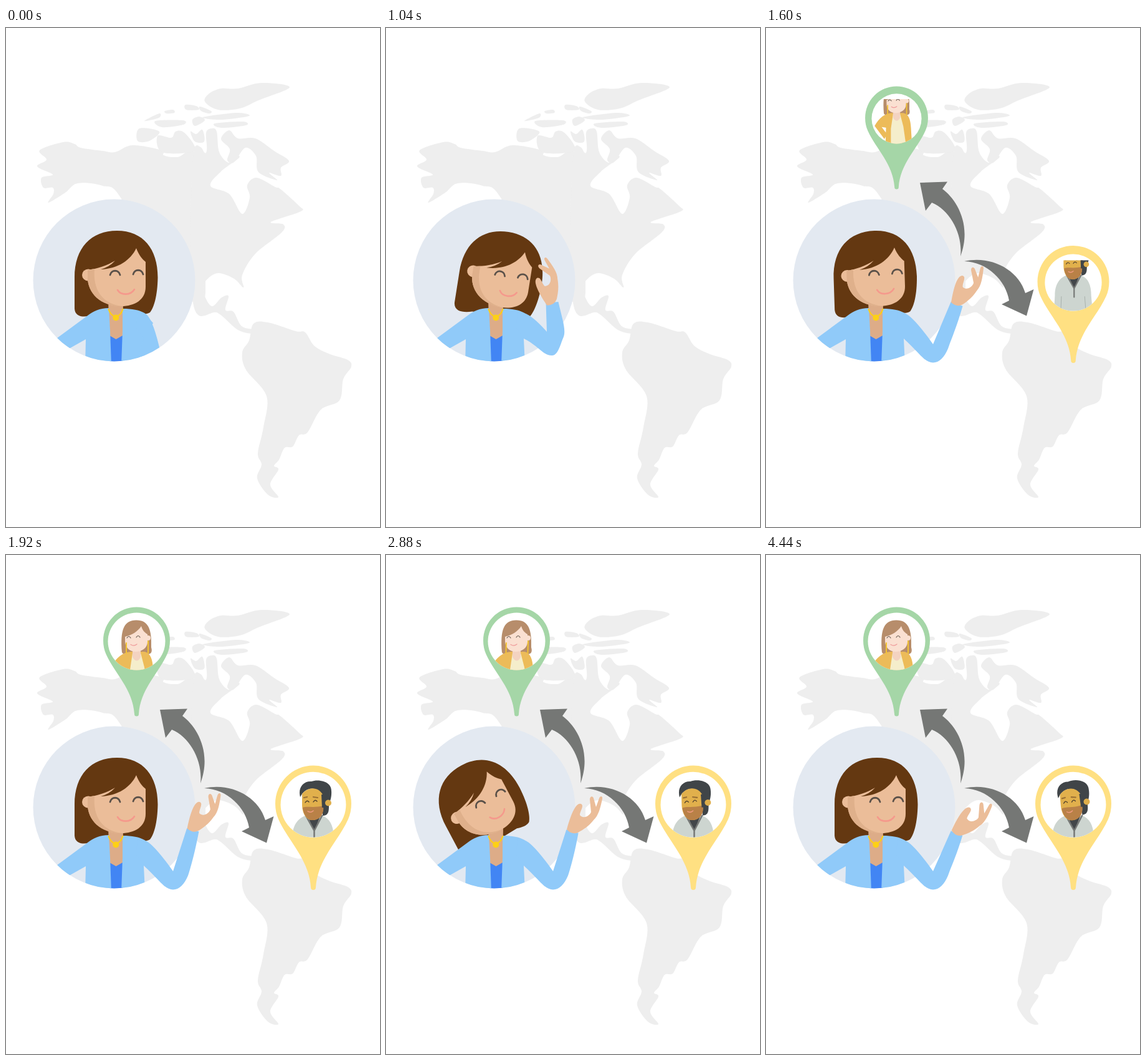
Recreate the animation shown at these times as an HTML page. Size 600 by 800 pixels, loop 8000 ms.

```html
<!DOCTYPE html>
<html lang="en">
<head>
<meta charset="utf-8">
<title>Connections across the map</title>
<style>
html, body { margin: 0; width: 100%; height: 100%; overflow: hidden; background: #fff; }
svg { display: block; width: 600px; height: 800px; }
.line { fill: none; stroke-linecap: round; }
</style>
</head>
<body>
<svg viewBox="0 0 600 800">
  <defs>
    <clipPath id="disc"><circle cx="173.5" cy="404.5" r="130"/></clipPath>
    <clipPath id="window"><path d="M-46-36V0A46 46 0 0 0 46 0V-36Z"/></clipPath>
    <path id="pinShape" d="M-53.5-121A53.5 53.5 0 0 1 53.5-121Q53.5-109 49-99C35-68 6-43 3.5-3A3.5 3.5 0 0 1-3.5-3C-6-43-35-68-49-99Q-53.5-109-53.5-121Z"/>
  </defs>

  <g id="map" fill="#eee">
    <!-- west and north coast -->
    <polygon points="50,222 65,211 54,196 92,183 110,186 120,192 155,197 175,199 203,188 250,196 253,204 275,207 318,201 320,380 312,440 250,400 184,272 155,253 115,249 95,264 68,280 76,266 75,256 60,256 57,240 75,235"/>
    <!-- east coast, bay and isthmus -->
    <polygon points="300,206 321,200 321,168 330,161 338,166 342,199 357,216 366,205 374,208 345,230 328,253 358,266 379,298 391,272 387,252 402,240 432,255 440,258 470,285 473,294 425,311 445,315 442,328 400,362 379,396 381,416 366,402 340,393 320,406 317,424 330,446 346,432 357,430 352,452 365,455 378,478 399,484 397,490 372,484 340,457 300,440"/>
    <polygon points="345,178 358,164 372,177 400,177 430,197 454,213 441,224 441,237 422,232 435,244 405,231 401,205 384,192 366,215 355,212 359,194"/>
    <!-- south -->
    <polygon points="397,474 420,472 465,486 480,488 495,510 520,523 548,532 554,543 541,563 535,597 505,612 484,648 470,653 460,671 447,673 438,692 430,702 437,708 424,732 437,752 420,748 403,722 410,700 404,682 413,640 418,590 385,548 379,520 390,501"/>
    <!-- arctic islands -->
    <polygon points="345,97 372,97 410,88 455,95 405,116 375,129 340,131 319,118 326,105"/>
    <polygon points="316,143 370,136 390,141 345,147"/>
    <polygon points="335,153 380,150 385,156 345,160"/>
    <polygon points="288,123 305,125 309,131 289,131"/>
    <polygon points="311,126 329,133 326,137 313,133"/>
    <polygon points="255,133 268,131 270,136 257,137"/>
    <polygon points="222,149 246,137 245,144"/>
    <polygon points="240,149 284,148 284,155 250,159"/>
    <polygon points="299,147 310,142 319,148 303,157"/>
    <polygon points="214,161 246,166 230,181 211,181"/>
    <polygon points="243,173 265,176 272,166 285,167 302,188 298,199 250,199"/>
    <polygon points="296,166 305,170 315,163 318,182 303,182"/>
  </g>
  <circle cx="173.5" cy="404.5" r="130" fill="#e3e9f1"/>

  <g fill="#757775">
    <path id="arrowUp" d="M247 248L291 246.500L283 258C305 274 331 315 312 366C316 330 295 292 266 280L256 293Z"/>
    <path id="arrowDown" d="M318 374C360 364 405 387 416 425L429.500 419L418 461.500L378 443L390 437C385 405 355 375 318 374Z"/>
  </g>

  <g id="greenPin">
    <use href="#pinShape" fill="#a5d6a7"/>
    <g class="porthole">
      <circle r="46" fill="#fff"/>
      <g clip-path="url(#window)"><g class="person"><g transform="translate(-209.500 -138.500)">
        <path fill="#b78d6b" d="M186 156C183 120 189 104.500 209 104.500C229 104.500 234 120 233 148Q236 159 227 159H194Q188 160 186 156Z"/>
        <path fill="#ecbb59" d="M200 155H222C232 157 235 167 236 182L238 215H189L190 182L182 181L192 194L187 203L169 179C177 164 188 156 200 155Z"/>
        <path fill="#f5eecb" d="M203 157L199 184V215H227L222 180L216 157Z"/>
        <path fill="#f3d3c1" d="M203 150H216V164Q210 175 203 164Z"/>
        <circle cx="228" cy="133" r="4" fill="#fae0d1"/>
        <path fill="#fae0d1" d="M191 131C203 128 212 122 217 114C219 121 223 125 227 127V139C227 149 218 155 208 155C198 155 191 148 191 138Z"/>
        <path class="line" stroke="#685a52" stroke-width="1.2" d="M194 133Q197 128 200 133M209 132Q212 127 215 132"/>
        <path class="line" stroke="#ef9a9a" stroke-width="1.3" d="M200 143.500Q205 147 210 143"/>
        <g class="line" stroke="#f4c430" stroke-width="2">
          <path class="earring" d="M193 141V157"/><path class="earring" d="M228 138V157"/>
        </g>
      </g></g></g>
    </g>
  </g>

  <g id="yellowPin">
    <use href="#pinShape" fill="#ffe082"/>
    <g class="porthole">
      <circle r="46" fill="#fff"/>
      <g clip-path="url(#window)"><g class="person"><g transform="scale(.877) translate(-493 -400.300)">
        <path fill="#cdd5d0" d="M459 455C459 432 470 420 484 417H504C518 420 526 432 526 455L529 490H457Z"/>
        <path class="line" stroke="#a9b2ad" stroke-width="1.2" d="M471 457L470 482M514 457L516 482"/>
        <path fill="#424649" d="M484 419H504L494.500 443Z"/>
        <path class="line" stroke="#757775" stroke-width="2.5" d="M481 418L494.500 442L507 418M494.500 441V458"/>
        <g id="manHead">
          <path fill="#404548" d="M472 388C468 373 477 362 490 363C500 359 522 362 522 378C523 391 518 397 518 404C518 413 516 418 508 418V385C499 372 485 371 475 383Z"/>
          <circle cx="517" cy="397.5" r="5" fill="#deae4b"/>
          <path fill="#e1b04c" d="M475 383C485 371 502 371 509 386V405C509 419 500 426 490 425C480 424 475 412 475 400Z"/>
          <path fill="#b98147" d="M476 405C483 402 493 406 509 402C511 418 501 426 490 425C482 424 477 415 476 405Z"/>
          <path fill="#404548" d="M506 384H510V405H507Z"/>
          <path class="line" stroke="#9a7034" stroke-width="2.2" d="M478 389L483 388M493 388L500 389"/>
          <path class="line" stroke="#56452d" stroke-width="1.4" d="M480 397Q483 392 486 396M493 396Q496 391 499 395"/>
          <path class="line" stroke="#ef9a7f" stroke-width="1.5" d="M484 411Q489 414 493 410"/>
        </g>
      </g></g></g>
    </g>
  </g>

  <g clip-path="url(#disc)">
    <path class="head" fill="#643811" d="M110 450V400C110 352 137 325 178 325C220 325 243.500 354 243.500 400C243 430 237 449 231 456C225 460 216 458 209 456L140 460C127 464 111 465 110 450Z"/>
    <path fill="#ddac88" d="M164 436H188L187 500H166Z"/>
    <path fill="#4285f4" d="M166 493L176.500 499L187 493V540H166Z"/>
    <path fill="#90caf9" d="M165 449C150 449 140 454 131 461L78 500L96 517L128 499L127 540H169L167 485ZM187 450C203 450 213 452 222 457L236 473L221 498L223 540H185L187 485Z"/>
    <path class="line" stroke="#fdd015" stroke-width="2.2" d="M164.500 451Q168 461 176 463Q184 461 187.500 451"/>
    <circle cx="176.3" cy="464.5" r="5" fill="#fdd015"/>
    <g class="head">
      <ellipse cx="132" cy="396" rx="10" ry="9.5" fill="#ebbd99"/>
      <path fill="#ebbd99" d="M131 388C146 386 162 381 175 373Q166 383 152 387C180 386 200 372 209 353C213 364 219 371 224 375V415C224 436 206 446 185 446C152 446 131 425 131 400Z"/>
      <path fill="#dfb08b" d="M131 388L142 386C139 420 155 443 187 446C152 447 131 425 131 400Z"/>
      <path class="line" stroke="#5b5149" stroke-width="2.8" d="M167 396C169 387 181 387 183 396M204 395C206 386 218 386 220 395"/>
      <path class="line" stroke="#f5998c" stroke-width="2.6" d="M179 420C184 429 200 429 206 419"/>
    </g>
  </g>

  <g id="arm">
    <path id="sleeve" fill="#90caf9"/>
    <path id="hand" fill="#ebbd99" d="M290 440C293 429 298 412 304 404C308 398 314 397 315 402C315 407 311 412 311 417C317 424 327 418 329 412L327 392C327 386 332 386 333 390L337 404L342 390C344 385 348 387 347 391C344 405 341 418 333 425C325 435 317 440 308 445Q298 449 290 440Z"/>
  </g>
</svg>

<script>
const $ = s => document.querySelector(s), all = s => document.querySelectorAll(s);
const set = (el, transform) => el.setAttribute('transform', transform);

// closed Catmull-Rom curve through a polygon's corners
function coast(polygon) {
  const pts = [...polygon.points].map(p => [p.x, p.y]);
  const at = i => pts[(i + pts.length) % pts.length];
  return 'M' + pts[0] + pts.map((p, i) => {
    const next = at(i + 1), before = at(i - 1), after = at(i + 2);
    const c1 = p.map((v, k) => v + (next[k] - before[k]) / 6);
    const c2 = next.map((v, k) => v - (after[k] - p[k]) / 6);
    return `C${c1} ${c2} ${next}`;
  }).join('') + 'Z';
}
$('#map').innerHTML = [...all('#map polygon')].map(p => `<path d="${coast(p)}"/>`).join('');

// keys: [time, ...values], eased between neighbours
function track(keys, t) {
  const i = keys.findIndex(k => k[0] > t);
  if (i === 0) return keys[0].slice(1);
  if (i < 0) return keys[keys.length - 1].slice(1);
  const a = keys[i - 1], b = keys[i], p = (t - a[0]) / (b[0] - a[0]), e = p * p * (3 - 2 * p);
  return a.slice(1).map((v, k) => v + (b[k + 1] - v) * e);
}

const headTurn = [[40, 0], [900, 9], [1080, 9], [1420, -3.5], [1800, 0], [2500, 0], [2900, -28.2], [3060, -29], [3480, -27], [4280, 0]];
const manTurn = [[2440, 0], [3700, -5]];
const pinScale = [[1240, 0], [1700, 1.07], [1920, 1]];
const portholeScale = [[1240, .5], [1720, 1]];
const personRise = [[1300, 90], [1560, -27], [1640, -27], [1900, 0]];
const arrowScale = [[1220, 0], [1520, 1]];
// inner bend, outer bend, lowest point
const elbow = [
  [420, 250, 530, 262, 600, 222, 570],
  [600, 254, 512, 290, 545, 258, 550],
  [760, 252, 492, 277, 500, 256, 529],
  [1040, 258, 487, 285, 495, 266, 525],
  [1140, 258, 488, 285, 496, 266, 526],
  [1460, 268, 507, 292, 514, 268, 536.5],
];
// wrist position and hand angle
const wrist = [
  [420, 262, 640, 90], [600, 310, 520, 40], [760, 258, 446, -55],
  [1040, 266.5, 440, -49], [1140, 266, 441, -50], [1460, 312, 447, 4],
  [1620, 306, 442, -6], [2100, 297, 440, -2.5], [2480, 297, 440, -2.5],
  [2880, 299, 443, 0], [3720, 300, 443, .5], [4400, 306, 446, 10],
];

function drawArm(t) {
  const [ix, iy, ox, oy, bx, by] = track(elbow, t), [wx, wy, turn] = track(wrist, t);
  const dir = Math.atan2(wy - (iy + oy) / 2, wx - (ix + ox) / 2);
  const dx = -10 * Math.sin(dir), dy = 10 * Math.cos(dir);
  const rx = wx + dx, ry = wy + dy;
  $('#sleeve').setAttribute('d', `M212 453L222 457Q236 462 ${ix} ${iy}L${wx - dx} ${wy - dy}L${rx} ${ry}` +
    `C${(rx + ox) / 2 + 2} ${(ry + oy) / 2} ${ox + 4} ${oy - 12} ${ox} ${oy}` +
    `C${ox - 6} ${oy + 14} ${bx + 10} ${by} ${bx} ${by}` +
    `C${bx - 14} ${by} ${bx - 22} ${by - 16} 221 498L208 480Z`);
  set($('#hand'), `translate(${wx} ${wy}) rotate(${turn}) translate(-299 -443)`);
  if (t < 760) $('#arm').setAttribute('clip-path', 'url(#disc)');
  else $('#arm').removeAttribute('clip-path');
}

function draw(t) {
  const [head] = track(headTurn, t), [man] = track(manTurn, t), [arrow] = track(arrowScale, t);
  const [pin] = track(pinScale, t), [porthole] = track(portholeScale, t), [rise] = track(personRise, t);
  const swing = t > 2520 && t < 4200 ? 4 * Math.sin((t - 2520) / 420 * Math.PI) : 0;

  all('.head').forEach(el => set(el, `rotate(${head} 174 445)`));
  set($('#greenPin'), `translate(209.5 258) scale(${pin})`);
  set($('#yellowPin'), `translate(493 536.5) scale(${pin * 1.14})`);
  all('.porthole').forEach(el => set(el, `translate(0 -119.5) scale(${porthole})`));
  all('.person').forEach(el => set(el, `translate(0 ${rise})`));
  set($('#manHead'), `rotate(${man} 493 425)`);
  all('.earring').forEach((el, i) => set(el, `rotate(${swing} ${i ? 228 : 193} 139)`));
  set($('#arrowUp'), `translate(312 366) scale(${arrow}) translate(-312 -366)`);
  set($('#arrowDown'), `translate(318 374) scale(${arrow}) translate(-318 -374)`);
  drawArm(t);
}

const start = performance.now();
function tick() {
  draw((performance.now() - start) % 8000);
  requestAnimationFrame(tick);
}
tick();
</script>
</body>
</html>
```
